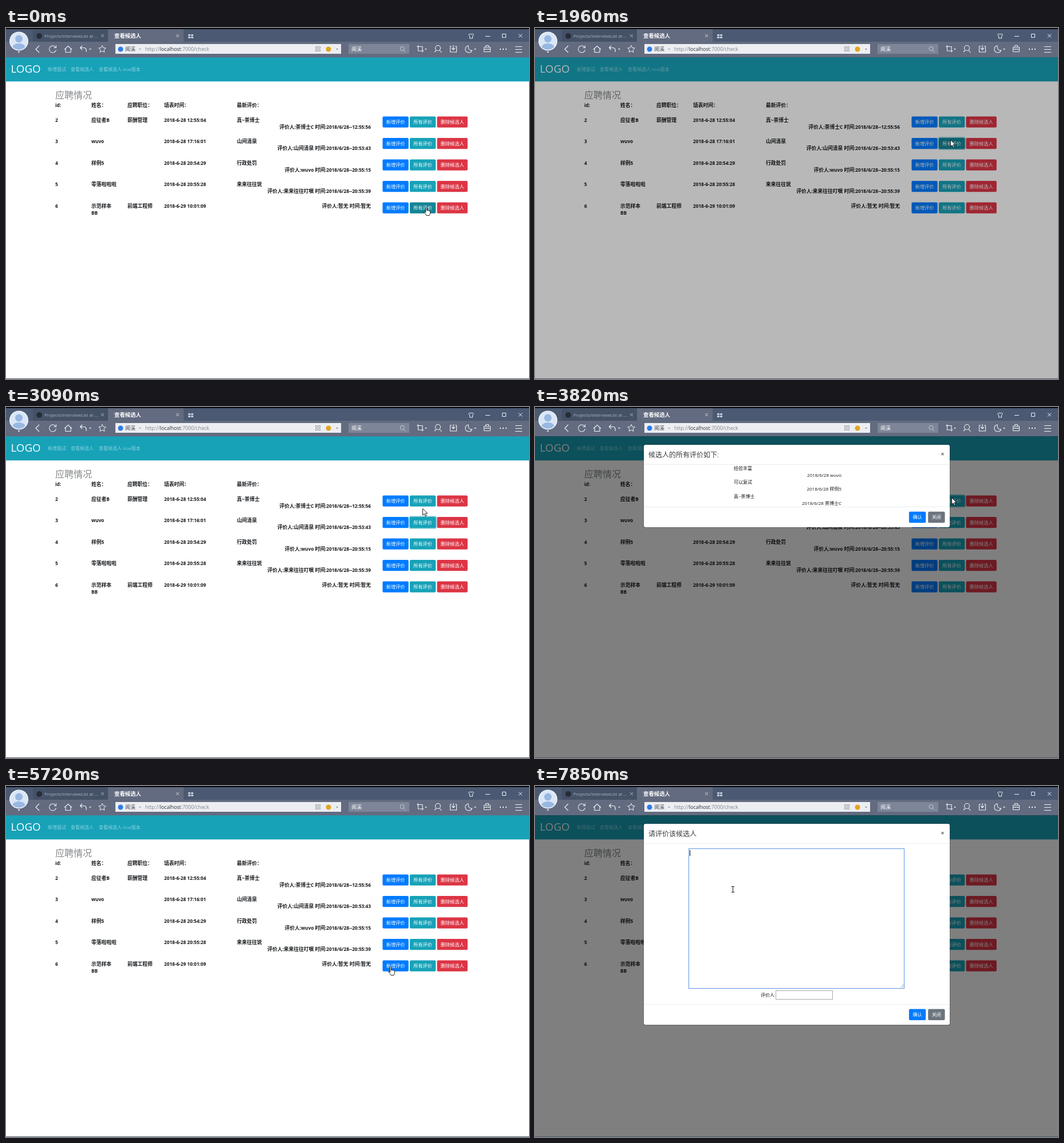
These frames come from a looping animation (913x613 px, 8 s). An HTML page with a canvas:

```html
<!DOCTYPE html>
<html lang="zh-CN">
<head>
<meta charset="utf-8">
<title>查看候选人</title>
<style>
html, body { margin: 0; width: 100%; height: 100%; overflow: hidden; background: #fff; }
canvas { display: block; }
</style>
</head>
<body>
<canvas id="stage" width="913" height="613"></canvas>
<script>
const ctx = document.getElementById('stage').getContext('2d');
const W = 913, H = 613, LOOP = 8000;
const FONT = '"Open Sans", "Noto Sans CJK SC", "Noto Sans CJK", sans-serif';
const TEAL = '#17a2b8', BLUE = '#007bff', RED = '#dc3545', INK = '#16191c';

// ---- timing ----
// Runs of screen updates: first, last, number of steps.
const RUNS = [[0, 0, 1], [150, 270, 2], [630, 1030, 4], [1300, 2200, 8], [2350, 2350, 1],
  [2630, 3660, 8], [3820, 3820, 1], [4120, 5050, 8], [5170, 6140, 8], [6260, 6920, 6],
  [7290, 7290, 1], [7850, 7850, 1]];

function snap(t) {
  t += 8;
  const [a, b, n] = RUNS.filter(r => r[0] <= t).pop();
  if (n < 2) return a;
  const step = (b - a) / (n - 1);
  return a + step * Math.min(n - 1, Math.floor((t - a) / step));
}
const ramp = (t, a, len) => Math.max(0, Math.min(1, (t - a) / len));
const easeOut = p => 1 - (1 - p) * (1 - p);

// ---- data ----
const ROWS = [
  ['2', '应征者B', '薪酬管理', '2018-6-28 12:55:04', '真~茶博士', '茶博士C', '2018/6/28--12:55:56'],
  ['3', 'wuvo', '', '2018-6-28 17:16:01', '山间清泉', '山间清泉', '2018/6/28--20:53:43'],
  ['4', '样例5', '', '2018-6-28 20:54:29', '行政处罚', 'wuvo', '2018/6/28--20:55:15'],
  ['5', '零落啦啦啦', '', '2018-6-28 20:55:28', '来来往往说', '来来往往叮嘱', '2018/6/28--20:55:39'],
  ['6', '示范样本', '前端工程师', '2018-6-29 10:01:09', '', '暂无', '暂无']
];
const COLS = [86, 149, 212, 276, 403];
const BTN_H = 19.33;
const BUTTONS = [
  { x: 657.4, w: 45.33, text: '新增评价', color: BLUE, hover: '#0069d9', ring: 'rgba(0,123,255,.5)' },
  { x: 704.95, w: 45.33, text: '所有评价', color: TEAL, hover: '#138496', ring: 'rgba(23,162,184,.5)' },
  { x: 752.5, w: 53.33, text: '删除候选人', color: RED, hover: '#c82333', ring: 'rgba(220,53,69,.5)' }
];
const rowY = i => 160.3 + 37.5 * i;
const btnY = i => 154.4 + 37.5 * i;

const DIALOGS = [
  { open: 560, close: 1250, blur: 1840, row: 3, col: 1, notes: [['来来往往说', '来来往往叮嘱']] },
  { open: 1859, close: 2600, blur: 3320, row: 1, col: 1,
    notes: [['沟通顺畅', 'wuvo'], ['表现不错', '样例5'], ['山间清泉', '山间清泉']] },
  { open: 3328, close: 4085, blur: 4600, row: 0, col: 1,
    notes: [['经验丰富', 'wuvo'], ['可以复试', '样例5'], ['真~茶博士', '茶博士C']] },
  { open: 6080, close: 9000, blur: 9999, row: 4, col: 0 }
];

// time, x, y, shape
const TRACK = [[0, 733, 312, 'hand'], [100, 733, 312, 'hand'], [270, 732, 274, 'hand'], [560, 732, 274, 'arrow'],
  [1560, 732, 274, 'arrow'], [1800, 725, 195, 'arrow'], [2780, 725, 195, 'arrow'],
  [2971, 727, 184, 'arrow'], [3071, 727, 177, 'arrow'], [3200, 727, 158, 'hand'],
  [3328, 727, 158, 'arrow'], [4250, 727, 158, 'arrow'], [4520, 731, 210, 'arrow'],
  [4650, 735, 274, 'arrow'], [4784, 735, 279, 'arrow'], [4900, 735, 306, 'hand'],
  [5170, 725, 335, 'arrow'], [5447, 690, 336, 'arrow'], [5620, 676, 330, 'arrow'],
  [5720, 671, 315, 'hand'], [6080, 671, 315, 'arrow'], [6390, 671, 315, 'arrow'],
  [6430, 640, 300, 'ibeam'], [6780, 345, 180, 'ibeam']];

function pointer(t) {
  const i = Math.max(0, TRACK.findLastIndex(k => k[0] <= t));
  const a = TRACK[i], b = TRACK[i + 1] || a;
  const p = b === a ? 0 : ramp(t, a[0], b[0] - a[0]);
  return { x: a[1] + (b[1] - a[1]) * p, y: a[2] + (b[2] - a[2]) * p, shape: a[3] };
}
const shade = (d, t) => Math.min(ramp(t, d.open, 150), 1 - ramp(t, d.close + 300, 150));
const covered = t => DIALOGS.some(d => shade(d, t) > 0);

// ---- drawing helpers ----
function rect(x, y, w, h, fill) {
  ctx.fillStyle = fill;
  ctx.fillRect(x, y, w, h);
}
function round(x, y, w, h, r, fill) {
  ctx.beginPath();
  ctx.roundRect(x, y, w, h, r);
  ctx.fillStyle = fill;
  ctx.fill();
}
function frame(x, y, w, h, color) {
  ctx.strokeStyle = color;
  ctx.lineWidth = 1;
  ctx.strokeRect(x + .5, y + .5, w - 1, h - 1);
}
function disc(x, y, r, fill) {
  ctx.beginPath();
  ctx.arc(x, y, r, 0, 7);
  ctx.fillStyle = fill;
  ctx.fill();
}
function line(d, color = '#e4e7ee', width = 1) {
  ctx.strokeStyle = color;
  ctx.lineWidth = width;
  ctx.stroke(new Path2D(d));
}
function shape(d, fill) {
  ctx.fillStyle = fill;
  ctx.fill(new Path2D(d));
}
// y is the middle of the line; bold Latin runs are set a little smaller than Han.
function text(str, x, y, size, color, { weight = 400, align = 'left' } = {}) {
  const runs = (str.match(/[\u4e00-\u9fff\uff1a]+|[^\u4e00-\u9fff\uff1a]+/g) || []).map(s => {
    const han = /[\u4e00-\u9fff\uff1a]/.test(s);
    const font = `${weight} ${han || weight < 600 ? size : size * .94}px ${FONT}`;
    ctx.font = font;
    return { s, font, w: ctx.measureText(s).width };
  });
  const total = runs.reduce((sum, r) => sum + r.w, 0);
  x -= align === 'right' ? total : align === 'center' ? total / 2 : 0;
  ctx.fillStyle = color;
  for (const r of runs) {
    ctx.font = r.font;
    ctx.fillText(r.s, x, y + size * .37);
    x += r.w;
  }
  return x;
}
function button(x, y, w, h, label, color, ring) {
  if (ring) round(x - 1.6, y - 1.6, w + 3.2, h + 3.2, 3.6, ring);
  round(x, y, w, h, 2, color);
  text(label, x + w / 2, y + h / 2, 8.2, '#fff', { align: 'center' });
}
const caretDown = (x, y, c = '#dfe3ea') => shape(`M${x - 2} ${y - 1}h4l-2 2.5z`, c);
const cross = (x, y, r, c) => line(`M${x - r} ${y - r}l${2 * r} ${2 * r}m0 ${-2 * r}l${-2 * r} ${2 * r}`, c);

// ---- browser frame ----
function drawTabs() {
  rect(0, 0, W, 25, '#4b5a72');
  rect(0, 0, W, 2, '#05070b');
  rect(47, 3, 131, 21, '#455167');
  rect(178, 2, 132, 23, '#636b80');
  rect(0, 24, W, 27, '#636b80');
  disc(58, 14, 5, '#262d39');
  text('Projects/interviewList at ...', 67, 14, 7.7, '#aab3c3');
  cross(168.5, 13.5, 2.5, '#b3bac8');
  text('查看候选人', 189, 14, 9.4, '#fff', { weight: 700 });
  cross(299.5, 13.5, 2.5, '#d3d8e1');
  for (const [x, y] of [[318, 11], [323, 11], [318, 15], [323, 15]]) rect(x, y, 4, 3, '#c3cad6');
  line('M809.5 10l-2 2 2 2v4h5v-4l2-2-2-2q-2.500 2-5 0z', '#f0f2f6');
  line('M837 14.500h8M866.500 10.500h6v6h-6z', '#f0f2f6');
  cross(898, 13.5, 3, '#f0f2f6');
}
function drawAvatar() {
  disc(22.5, 23, 16.5, '#eff4fb');
  ctx.save();
  ctx.beginPath();
  ctx.arc(22.5, 23, 15, 0, 7);
  ctx.clip();
  rect(6, 6, 34, 34, '#d9e6f6');
  disc(22.5, 19, 6.5, '#98b8e2');
  shape('M10 40q0-13 12.500-13t12.500 13z', '#98b8e2');
  ctx.restore();
  caretDown(22.5, 42, '#fff');
}
function drawToolbar() {
  line('M58 31l-6 6 6 6', '#eef0f4', 1.2);
  line('M86.500 33.500a6 6 0 1 0 1 4.500M87.500 30.500v4h-4', '#eef0f4', 1.1);
  line('M102 37.500l6.500-6 6.500 6M104 36v6.500h9V36', '#eef0f4', 1.1);
  line('M133 31l-3.500 3.500 3.500 3.500M130 34.500h6q5 0 4 7.500', '#eef0f4', 1.2);
  caretDown(147, 37);
  line('M168 30.500l1.900 4 4.400.500-3.300 3 .900 4.400-3.900-2.200-3.900 2.200.900-4.400-3.300-3 4.400-.500z', '#eef0f4');

  rect(191, 28, 394, 17, '#eceef2');
  disc(200, 37, 4.5, '#2f7be8');
  text('闻溪', 208, 36.5, 9, '#4a4f58');
  caretDown(234, 37, '#9aa0aa');
  let x = text('http://', 243, 37, 8.8, '#80858e');
  x = text('localhost', x, 37, 8.8, '#2c3036');
  text(':7000/check', x, 37, 8.8, '#80858e');
  for (const [dx, dy] of [[0, 0], [5, 0], [0, 5], [5, 5]]) frame(540 + dx, 32 + dy, 4, 4, '#a0a4ab');
  disc(563, 37, 4.5, '#e2a61d');
  caretDown(578, 37, '#8a9099');

  rect(598, 28, 106, 17, '#7d8598');
  text('闻溪', 603, 36.5, 9, '#fff');
  line('M695 36a3.500 3.500 0 1 1-7 0a3.500 3.500 0 1 1 7 0M694 39l3 3', '#c5cad4');

  line('M719.500 30v10h10M717 32.500h10v10', '#eef0f4', 1.1);
  caretDown(733, 37);
  line('M758.500 35a4.500 4.500 0 1 1-9 0a4.500 4.500 0 1 1 9 0M756.500 38.500l4 4.500M751 39l-3 3', '#eef0f4', 1.1);
  line('M778 32h-2.500v10h11v-10H784M781 30v8m-3-3l3 3 3-3', '#eef0f4', 1.1);
  line('M807 31a6 6 0 1 0 6.500 8q-7 1-6.500-8z', '#eef0f4', 1.1);
  caretDown(819, 37);
  line('M834.500 33.500h11v8h-11zM837.500 33v-2.500h5V33M834.500 37h11M838 36v2m4-2v2', '#eef0f4');
  for (const dx of [0, 5, 10]) rect(862 + dx, 36, 2, 2, '#eef0f4');
  line('M889 32.500h12M889 37.500h12M889 42.500h12', '#eef0f4');
}

// ---- page ----
function drawPage(t) {
  rect(0, 51, W, 562, '#fff');
  rect(0, 51, W, 1, '#636b80');
  rect(0, 51.33, W, 42, TEAL);
  text('LOGO', 8.5, 71.5, 18.7, '#fff');
  text('新增面试', 73, 72, 8, '#8bd1dc');
  text('查看候选人', 113, 72, 8, '#8bd1dc');
  text('查看候选人-Vue版本', 162, 72, 8, '#8bd1dc');
  text('应聘情况', 86, 117.5, 16, '#85898c', { weight: 300 });

  const bold = { weight: 700 }, right = { weight: 700, align: 'right' };
  ['id:', '姓名：', '应聘职位：', '填表时间：', '最新评价：'].forEach((s, i) => text(s, COLS[i], 135, 8.75, INK, bold));

  const late = t - 100, at = pointer(late), free = !covered(late);
  ROWS.forEach((row, i) => {
    const y = rowY(i), top = btnY(i);
    COLS.forEach((x, c) => text(row[c], x, y, 8.75, INK, bold));
    if (i === 4) text('BB', 149, y + 12, 8.75, INK, bold);
    text(`评价人:${row[5]} 时间:${row[6]}`, 637, row[4] ? y + 12 : y, 8.75, INK, right);
    BUTTONS.forEach((b, c) => {
      const hot = free && at.x >= b.x && at.x <= b.x + b.w && at.y >= top && at.y <= top + BTN_H;
      const focus = DIALOGS.some(d => d.row === i && d.col === c && t >= d.open - 20 && t < d.blur);
      button(b.x, top, b.w, BTN_H, b.text, hot ? b.hover : b.color, focus && b.ring);
    });
  });
}

function drawNotes(notes) {
  notes.forEach(([note, who], i) => {
    text(note, 347, 107 + 24.3 * i, 8, INK);
    text(`2018/6/28 ${who}`, 535, 119 + 24.3 * i, 8, INK, { align: 'right' });
  });
}
function drawEditor(t) {
  const active = t >= 6760;
  rect(268, 109, 377, 245, '#fff');
  frame(268, 109, 377, 245, active ? '#5a94e4' : '#a9a9a9');
  line('M638.500 351.500l5-5M641.500 351.500l2-2', '#8a8a8a', .8);
  if (active && Math.floor((t - 6760) / 530) % 2 === 0) rect(270, 112, 1, 10, '#000');
  text('评价人', 394, 365, 8, INK);
  frame(420, 357, 100, 16, '#a9a9a9');
}
function drawDialog(d, t) {
  const dark = shade(d, t);
  if (!dark) return;
  rect(0, 51, W, 561, `rgba(0,0,0,${dark / 2})`);

  const start = d.open + 165;
  const alpha = ramp(t, start, 150) * (1 - ramp(t, d.close, 150));
  if (!alpha) return;
  const foot = d.notes ? 101 + 24.4 * d.notes.length : 381;
  const h = Math.round(foot + 36 - 66);
  const away = 1 - easeOut(ramp(t, start, 300)) + easeOut(ramp(t, d.close, 300));
  ctx.save();
  ctx.beginPath();
  ctx.rect(0, 51, W, 561);
  ctx.clip();
  ctx.globalAlpha = alpha;
  ctx.translate(0, -Math.round(h / 4 * away));
  round(189, 65, 536, h + 2, 3, 'rgba(0,0,0,.2)');
  round(190, 66, 534, h, 3, '#fff');
  text(d.notes ? '候选人的所有评价如下:' : '请评价该候选人', 198, 84, 12, '#3a3d40', { weight: 300 });
  text('×', 711.5, 81.5, 11, '#5c5c5c', { weight: 700, align: 'center' });
  rect(190, 100, 534, 1, '#e9ecef');
  rect(190, Math.round(foot), 534, 1, '#e9ecef');
  if (d.notes) drawNotes(d.notes); else drawEditor(t);
  const y = foot + 8.6;
  button(652.9, y, 29.33, BTN_H, '确认', BLUE);
  button(686.2, y, 29.33, BTN_H, '关闭', '#6c757d');
  ctx.restore();
}

// ---- pointer ----
const CURSORS = {
  arrow: 'M0 0v11.500l2.700-2.500 1.900 4.300 1.900-.800-1.900-4.200h3.700z',
  hand: 'M-1 1q1-2 2 0v5.500q1-1.200 2 0q1-1 2 .300q1.500-.800 2 .700v3.500q-.500 2-1.500 4h-5q-1.500-3-4-5q-.500-2 1-1.500l1.500 1.300z'
};
function drawPointer(t) {
  const p = pointer(t);
  ctx.save();
  ctx.translate(Math.round(p.x) + .5, Math.round(p.y) + .5);
  if (p.shape === 'ibeam') {
    line('M-2.500-5h2l.500.500.500-.500h2M0-5v10M-2.500 5h2l.500-.500.500.500h2', '#111');
  } else {
    shape(CURSORS[p.shape], '#fff');
    line(CURSORS[p.shape], '#111', .9);
  }
  ctx.restore();
}

function draw(now) {
  const t = snap(now % LOOP);
  drawPage(t);
  for (const d of DIALOGS) drawDialog(d, t);
  drawTabs();
  drawToolbar();
  drawAvatar();
  rect(0, 612, W, 1, '#4b5a72');
  drawPointer(t);
}

const begin = performance.now();
function tick() {
  draw(performance.now() - begin);
  requestAnimationFrame(tick);
}
tick();
</script>
</body>
</html>
```
